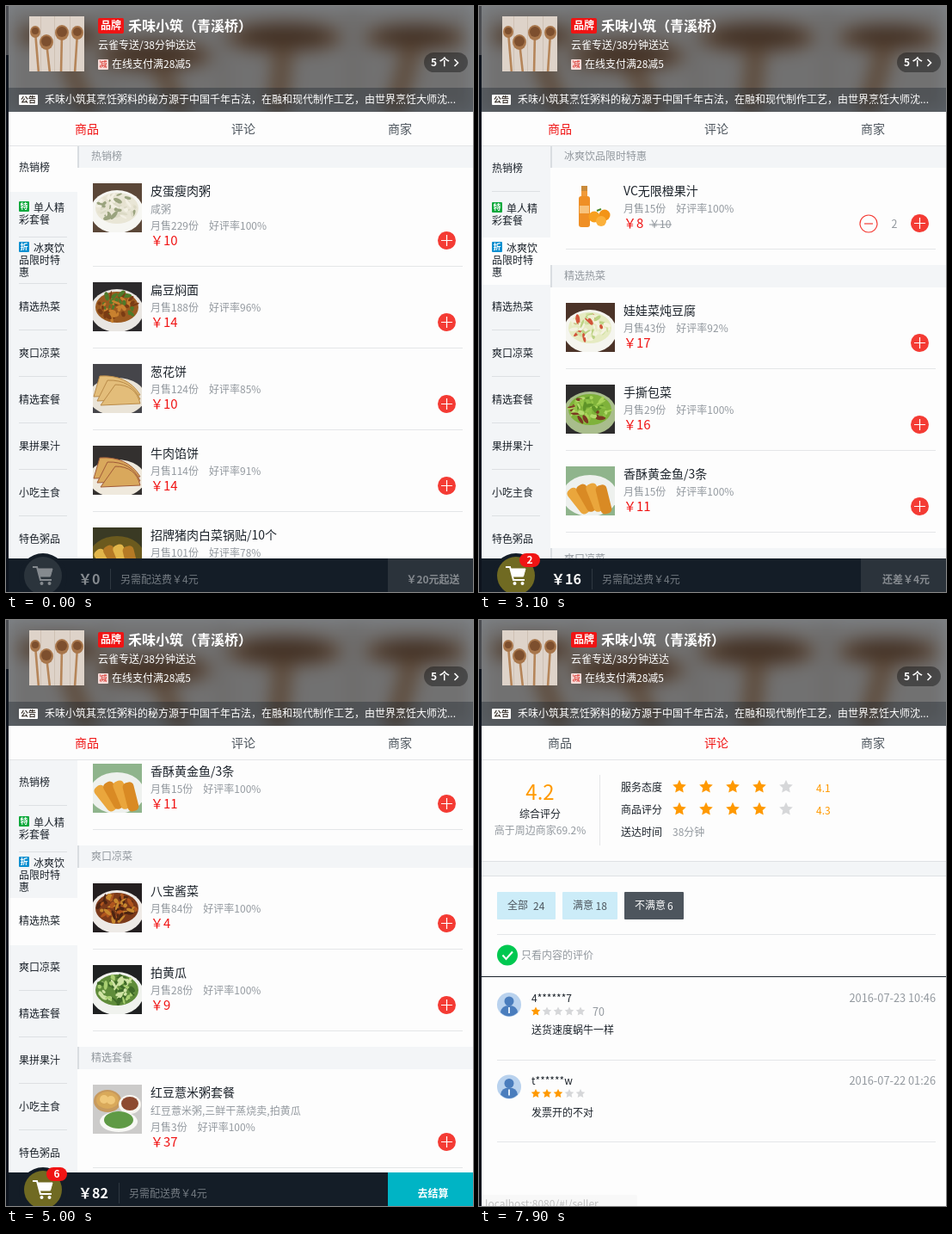
Recreate the animation shown at these times as an HTML page. Size 543 by 681 pixels, loop 8000 ms.

```html
<!DOCTYPE html>
<html lang="zh-CN">
<head>
<meta charset="utf-8">
<title>外卖点餐</title>
<style>
html, body { margin: 0; width: 100%; height: 100%; overflow: hidden; background: #fdfdfd; }
#stage { display: block; width: 543px; height: 681px; }
text { font-family: "Noto Sans CJK SC", "Noto Sans CJK", "Noto Sans", sans-serif; white-space: pre; }
.blur { filter: blur(10px); }
</style>
</head>
<body>
<svg id="stage" viewBox="0 0 543 681" xmlns="http://www.w3.org/2000/svg"></svg>
<script>
const RED = '#f01414', PLUS = '#f43b34', INK = '#1c232b', GREY = '#93999f', LINE = '#e4e6e8',
      PALE = '#f3f5f7', ORANGE = '#ff9900', BLUE = '#00a0dc', PAGE = '#fdfdfd', BAR = '#141d27';
const LOOP = 8000, STEP = 100, TOP = 162;

// --- drawing helpers; text is placed by its visual centre line
const rect = (x, y, w, h, fill, more = '') => `<rect x="${x}" y="${y}" width="${w}" height="${h}" fill="${fill}" ${more}/>`;
const oval = (x, y, rx, ry, fill, more = '') => `<ellipse cx="${x}" cy="${y}" rx="${rx}" ry="${ry}" fill="${fill}" ${more}/>`;
const disc = (x, y, r, fill, more) => oval(x, y, r, r, fill, more);
const path = (d, stroke, w = 1, fill = 'none') => `<path d="${d}" stroke="${stroke}" stroke-width="${w}" fill="${fill}"/>`;
const text = (x, y, s, size = 12, fill = INK, more = '') =>
  `<text x="${x}" y="${y + size * .37}" font-size="${size}" fill="${fill}" ${more}>${s}</text>`;
const BOLD = ' font-weight="700"', MID = 'text-anchor="middle"', END = 'text-anchor="end"';
const group = (id, body = '', more = '') => `<g id="${id}" ${more}>${body}</g>`;

function star(x, y, r, fill) {
  const pts = Array.from({ length: 10 }, (_, i) => {
    const a = i * Math.PI / 5, q = i % 2 ? r * .48 : r;
    return `${(x + q * Math.sin(a)).toFixed(1)},${(y - q * Math.cos(a)).toFixed(1)}`;
  });
  return `<polygon points="${pts.join(' ')}" fill="${fill}"/>`;
}
const stars = (x, y, n, gap, r) =>
  [0, 1, 2, 3, 4].map(i => star(x + i * gap, y, r, i < n ? ORANGE : '#d6d7d9')).join('');

function random(seed) {
  return () => (seed = seed * 16807 % 2147483647) / 2147483647;
}

// --- dish thumbnails, 57 x 57
const ART = {
  bowl(c, rnd) {
    let s = oval(28, 33, 31, 25, c[1]) + oval(28, 29, 25, 18, c[2]);
    for (let i = 0; i < 54; i++) {
      const a = rnd() * 6.28, d = Math.sqrt(rnd()), x = 28 + d * 22 * Math.cos(a), y = 28 + d * 15 * Math.sin(a);
      s += oval(x, y, 2 + rnd() * 4, 1 + rnd() * 1.5, c[3 + i % (c.length - 3)], `transform="rotate(${rnd() * 180} ${x} ${y})"`);
    }
    return s;
  },
  pie(c) {
    return oval(28, 38, 33, 22, c[1]) + [0, 1, 2].map(i =>
      path(`M${1 + i * 4} ${38 + i * 5}L${8 + i * 9} ${14 + i * 5}Q${40 + i * 5} ${12 + i * 6} 55 ${36 + i * 5}Z`, c[3], 1, c[2])).join('');
  },
  fish(c) {
    return oval(28, 34, 32, 24, c[1]) + [0, 1, 2, 3].map(i =>
      rect(5 + i * 10, 13 + i * 4, 13, 34, c[2 + i % 2], `rx="5" transform="rotate(${-38 + i * 8} 28 30)"`)).join('');
  },
  set(c) {
    return oval(17, 19, 16, 13, '#c79a5e') + oval(17, 18, 13, 10, c[1]) + disc(13, 17, 5, c[2]) + disc(21, 18, 5, c[2]) +
      oval(43, 23, 13, 11, '#f7f5f0') + oval(43, 22, 10, 8, '#8d4a30') + oval(30, 43, 22, 12, '#f8f8f5') + oval(30, 41, 17, 10, c[3]);
  },
  juice() {
    return rect(18, 3, 7, 6, '#c98a3a') + rect(18, 9, 7, 8, '#f09a3a') + rect(15, 15, 13, 36, '#ef8f25', 'rx="3"') +
      rect(16, 26, 11, 9, '#f8c37c') + disc(33, 39, 6.5, '#f7a01e') + disc(45, 37, 6.5, '#f39416') + disc(41, 44, 6, '#fbb03a') +
      path('M36 32l5 -2', '#4b8b2a', 2);
  }
};
function thumb(x, y, [kind, ...c], seed) {
  return `<svg x="${x}" y="${y}" width="57" height="57">${rect(0, 0, 57, 57, c[0])}${ART[kind](c, random(seed * 7919 + 13))}</svg>`;
}

// --- menu: name, price, sold, rating, thumbnail, description, old price
const MENU = [
  ['热销榜', [
    ['皮蛋瘦肉粥', 10, 229, 100, 'bowl #5b4738 #f6f6f2 #e9e6d6 #dcdac6 #9aa37e #f3f0e4 #e6e2d0', '咸粥'],
    ['扁豆焖面', 14, 188, 96, 'bowl #2c2a2c #e9e6e2 #9b5a20 #c9812f #4f7a2a #7a3c14'],
    ['葱花饼', 10, 124, 85, 'pie #45454a #eae4d8 #e3bd7a #b98a48'],
    ['牛肉馅饼', 14, 114, 91, 'pie #33302f #efe9dd #d9a85c #a05a38'],
    ['招牌猪肉白菜锅贴/10个', 17, 101, 78, 'fish #3a3a24 #6b5a1e #e2b64a #b57a25'],
    ['南瓜粥', 9, 91, 100, 'bowl #5a4434 #f4f2ee #f0b33a #f5c55a #e39a22', '甜粥'],
    ['红豆薏米美肌粥', 12, 86, 100, 'bowl #6b5444 #f4f2ee #a5574a #7d3430 #e6d6c4', '甜粥'],
    ['八宝酱菜', 4, 84, 100, 'bowl #2a2526 #eeeae6 #7c3a1a #a8521e #4d2412 #c8892f'],
    ['红枣山药糙米粥', 10, 81, 91, 'bowl #584336 #f4f2ee #d9b99a #a03a2a #f0e4d0'],
    ['糊塌子', 10, 80, 93, 'pie #3b3634 #ece8dc #dcc46a #8f9a3e']]],
  ['单人精彩套餐', [['红枣山药粥套餐', 29, 17, 100, 'set #c9c8c8 #f1e2c0 #fbf6ea #a6d352', '红枣山药糙米粥,素材包,爽口莴笋丝,四川泡菜或八宝酱菜,配菜可备注', 36]]],
  ['冰爽饮品限时特惠', [['VC无限橙果汁', 8, 15, 100, 'juice #fdfdfd', '', 10]]],
  ['精选热菜', [
    ['娃娃菜炖豆腐', 17, 43, 92, 'bowl #4b3328 #f5f5ef #e6ebc2 #d2e0a4 #f6f3df #eef0d2 #bcd284 #f4f2e2 #d2553a'],
    ['手撕包菜', 16, 29, 100, 'bowl #2d2c2c #a9bd8c #7fb23a #a9d45a #5f9428 #8cc044 #96c548 #b4da6c #7a3a22'],
    ['香酥黄金鱼/3条', 11, 15, 100, 'fish #8fb48c #eef1ee #eaa63c #d98a24']]],
  ['爽口凉菜', [
    ['八宝酱菜', 4, 84, 100, 'bowl #241f20 #eeeae6 #7c3a1a #b0561e #4d2412 #c8892f'],
    ['拍黄瓜', 9, 28, 100, 'bowl #1f2122 #f0f2ee #5f8c3a #a9cf72 #3f6a28 #cfe3a4']]],
  ['精选套餐', [['红豆薏米粥套餐', 37, 3, 100, 'set #cccbca #d9a95a #f0c87a #5f9a45', '红豆薏米粥,三鲜干蒸烧卖,拍黄瓜']]]
];
const SIDE = [['热销榜'], ['单人精', '彩套餐'], ['冰爽饮', '品限时特', '惠'], ['精选热菜'], ['爽口凉菜'],
              ['精选套餐'], ['果拼果汁'], ['小吃主食'], ['特色粥品']];

const offsets = [], controlY = {};
function menuList() {
  let y = 0, s = '', n = 0;
  for (const [title, foods] of MENU) {
    offsets.push(y);
    s += rect(83, y, 460, 26, PALE) + rect(83, y, 2, 26, '#d9dde1') + text(99, y + 13, title, 12, GREY);
    y += 44;
    for (const [name, price, sold, rate, art, desc, old] of foods) {
      const d = desc ? 20 : 0, cy = y + 46.5 + d, info = `月售${sold}份`;
      s += thumb(101, y, art.split(' '), ++n) + text(168, y + 9, name, 14);
      if (desc) s += text(168, y + 30.5, desc, 12, GREY);
      s += text(168, y + 30 + d * .97, `${info}<tspan dx="12">好评率${rate}%</tspan>`, 12, GREY);
      s += text(168, cy, '￥' + price, 15, RED);
      if (old) {
        const w = price > 9 ? 38 : 30;
        s += text(168 + w, cy + 1, '￥' + old, 12, GREY) + rect(168 + w, cy + 1, 26, 1, GREY);
      }
      s += disc(512.5, cy, 10.5, PLUS) + path(`M506 ${cy}h13M512.5 ${cy - 6.5}v13`, '#fff', 1.2);
      s += rect(101, y + 76 + d, 430, 1, LINE);
      controlY[name] = cy;
      y += 95 + d;
    }
  }
  return s;
}

function sidebar(active) {
  let s = rect(3, TOP, 80, 480, PALE);
  SIDE.forEach((lines, k) => {
    const shift = k >= active ? -1 : 0, top = TOP + 54 * k + shift, mid = top + 27;
    if (k !== active && k !== active - 1) s += rect(15, top + 53, 56, 1, '#dde0e3');
    if (k === active) s += rect(3, top, 80, 55, PAGE);
    const first = mid - (lines.length - 1) * 7;
    const tag = { 1: ['特', '#0aa83a'], 2: ['折', '#0a8fd0'] }[k];
    if (tag) s += rect(15, first - 8, 12, 12, tag[1], 'rx="1"') + text(21, first - 2, tag[0], 9, '#fff', MID + BOLD);
    lines.forEach((l, i) => s += text(tag && !i ? 32 : 15, first + i * 14, l));
  });
  return s;
}

// wooden spoons on a pale board, 64 x 64
function spoons() {
  const board = rect(0, 0, 64, 64, '#ded3c9') + [13, 29, 47].map(x => rect(x, 0, 1, 64, '#cfc1b4')).join('');
  return board + [[7, 18, 6, 4], [20, 30, 8, 4], [38, 19, 8, -1], [56, 19, 7, -3]].map(([x, y, r, lean]) =>
    path(`M${x} ${y}L${x + lean} 66`, '#b58559', 2.6) + oval(x, y, r, r + 1, '#a8764b') + oval(x, y - 1, r - 2, r - 2, '#7d4f2e')).join('');
}

function header() {
  return `<svg x="3" width="540" height="123"><g class="blur"><g transform="scale(8.4375 1.921875)">${spoons()}</g></g>` +
    rect(0, 0, 540, 123, '#07111b', 'opacity=".5"') + rect(0, 95, 540, 28, '#07111b', 'opacity=".3"') + '</svg>' +
    `<svg x="27" y="12" width="64" height="64">${spoons()}</svg>` +
    rect(107, 14, 30, 18, RED, 'rx="2"') + text(122, 23, '品牌', 12, '#fff', MID + BOLD) +
    text(142, 23, '禾味小筑（青溪桥）', 16, '#fff', BOLD) +
    text(107, 46, '云雀专送/38分钟送达', 12, '#fff') +
    rect(107, 62, 12, 12, '#f6dcd9', 'rx="1"') + text(113, 68, '减', 9, '#e0524c', MID + BOLD) +
    text(123, 68, '在线支付满28减5', 12, '#fff') +
    rect(486, 54, 51, 23, '#000', 'rx="11.5" opacity=".38"') + text(494, 65.5, '5 个', 12, '#fff', BOLD) +
    path('M521.5 62l4 4 -4 4', '#fff', 1.6) +
    rect(15, 103, 22, 12, '#fff', 'rx="1"') + text(26, 109, '公告', 9, '#3b342e', MID + BOLD) +
    text(45, 109, '禾味小筑其烹饪粥料的秘方源于中国千年古法，在融和现代制作工艺，由世界烹饪大师沈...', 12, '#fff', 'font-weight="500"');
}

const tabs = active => rect(3, 123, 540, 39, PAGE) + rect(3, 162, 540, 1, '#e3e5e7') +
  ['商品', '评论', '商家'].map((s, i) => text(94 + 182 * i, 143, s, 14, i === active ? RED : '#4d555d', MID)).join('');

function cart(count, total) {
  const on = count > 0, digits = String(total).length, split = 111 + 10 * digits, ink = on ? '#fff' : '#858a8f';
  const pay = total >= 20 ? '去结算' : on ? `还差￥${20 - total}元` : '￥20元起送';
  let s = rect(3, 642, 540, 39, BAR) + disc(43, 664, 28, BAR) + disc(43, 662, 22, on ? '#706a22' : '#2b343c');
  s += path('M31 652h5l4 15h13', ink, 2) + path('M37 654h17l-2.5 9h-12z', ink, 1, ink) + disc(41.5, 671, 2, ink) + disc(50.5, 671, 2, ink);
  s += text(84, 666, '￥' + total, 16, ink, BOLD) + rect(split, 654, 1, 24, '#2f3841') +
    text(split + 12, 667, '另需配送费￥4元', 12, '#747b82');
  s += rect(444, 642, 99, 39, total >= 20 ? '#00b4c5' : '#2b333b') +
    text(496.5, 667, pay, 12, total >= 20 ? '#fff' : '#858a8f', MID + BOLD);
  if (on) s += rect(47, 636, 24, 16, RED, 'rx="8"') + text(59, 644, count, 12, '#fff', MID + BOLD);
  return s;
}

// --- ratings page
function review(dy, [user, date, score, body, wait, likes]) {
  const y = 447 + dy, bottom = likes ? 532 : 510.5;
  let s = disc(35, y, 14, '#b9d2ee') + disc(35, y - 4, 5.5, '#4a7dbd') + path(`M25 ${y + 9}q1 -8 10 -8t10 8q-10 9 -20 0`, 'none', 0, '#4a7dbd') +
    path(`M35 ${y + 3}v7`, '#dce9f7', 2);
  s += text(61, y - 7, user) + text(531, y - 7.5, date, 12.8, GREY, END) + stars(66, y + 8, score, 13, 5.6);
  if (wait) s += text(132, y + 8.5, wait, 12.5, GREY);
  s += text(61, y + 30, body);
  if (likes) {
    s += rect(61, y + 53, 3, 8, BLUE) + path(`M65 ${y + 53}l3 -5q3 0 1.5 4h3.5l-1 9h-7z`, 'none', 0, BLUE);
    let x = 81;
    for (const like of likes) {
      const w = 12 * like.length + 14;
      s += rect(x + .5, y + 47.5, w - 1, 17, 'none', 'stroke="#dcdee0"') + text(x + 7, y + 56, like, 12, GREY);
      x += w + 8;
    }
  }
  return s + rect(21, Math.round(bottom + dy), 510, 1, LINE);
}
const GOOD = [
  ['5******k', '2016-07-23 21:52', 5, '不错,粥很好喝,我经常吃这一家,非常赞,以后也会常来吃,强烈推荐.', 30, ['南瓜粥', '皮蛋瘦肉粥', '扁豆焖面', '娃娃菜炖豆腐', '牛肉馅饼']],
  ['8******6', '2016-07-23 18:54', 4, '服务态度不错', 0, ['扁豆焖面']],
  ['6******m', '2016-07-23 16:17', 5, '', 0, []]];
const BAD = [
  ['4******7', '2016-07-23 10:46', 1, '送货速度蜗牛一样', 70],
  ['t******w', '2016-07-22 01:26', 3, '发票开的不对', 0]];

function ratings(filter) {
  let s = rect(3, 163, 540, 518, PAGE);
  s += text(71, 200, '4.2', 24, ORANGE, MID) + text(71, 226, '综合评分', 12, INK, MID) +
    text(71, 245, '高于周边商家69.2%', 12, GREY, MID) + rect(140, 180, 1, 82, LINE);
  [['服务态度', '4.1'], ['商品评分', '4.3']].forEach(([label, score], i) => {
    const y = 195 + 26 * i;
    s += text(165, y, label) + stars(233, y - 1, 4, 31, 8.2) + text(392, y + .5, score, 12, ORANGE);
  });
  s += text(165, 247, '送达时间') + text(225, 247, '38分钟', 12, GREY);
  s += rect(3, 280, 540, 18, PALE) + rect(3, 280, 540, 1, '#dfe1e4') + rect(3, 297, 540, 1, '#dfe1e4');
  [[21, 68, '全部', 63, 24, '#ccecf8', BLUE], [97, 64, '满意', 135.5, 18, '#ccecf8', BLUE],
   [169, 69, '不满意', 219, 6, '#dbdcdf', '#4d555d']].forEach(([x, w, label, nx, n, off, on], i) => {
    const ink = i === filter ? '#fff' : '#4d555d', more = i === filter ? 'font-weight="500"' : '';
    s += rect(x, 316, w, 32, i === filter ? on : off, 'rx="1"') + text(x + 12, 332, label, 12, ink, more) + text(nx, 332.5, n, 12, ink, more);
  });
  s += rect(21, 365, 510, 1, LINE) + disc(33, 389.5, 12, '#00c850') + path('M27.5 389.5l4 4.5 7.5 -8.5', '#fff', 2) +
    text(49, 390, '只看内容的评价', 12, GREY) + rect(3, 414, 540, 1, '#1a222b');
  return s + (filter === 2 ? BAD : GOOD).map((r, i) => review(i * (filter === 2 ? 95.5 : 117.5), r)).join('');
}

// --- timeline
const SCROLL = [[800, 0], [900, 585], [1000, 965], [1100, 1053], [1200, 1054], [1600, 1054], [1700, 1142], [1800, 1200], [1900, 1213],
                [4400, 1213], [4500, 1275], [4600, 1361], [4700, 1450], [4800, 1520], [4900, 1562], [5000, 1581]];
const HINT = [[5400, 0], [5500, .5], [5600, 1], [6600, 1], [6700, .5], [6800, 0], [7800, 0], [7900, .45]];
const BUYS = [
  { name: 'VC无限橙果汁', price: 8, at: 2630, again: 2900 },
  { name: '娃娃菜炖豆腐', price: 17, at: 3401, again: 3700 },
  { name: '手撕包菜', price: 16, at: 4015, again: 4300 }];
const PAGE_AT = 5900, FLIGHT = 400, BUY_SCROLL = 1213;

function track(keys, t) {
  const i = keys.findIndex(k => k[0] > t);
  if (i === 0) return keys[0][1];
  if (i < 0) return keys[keys.length - 1][1];
  const [t0, a] = keys[i - 1], [t1, b] = keys[i];
  return a + (b - a) * (t - t0) / (t1 - t0);
}
function bezier(x1, y1, x2, y2, x) {
  const f = (a, b, s) => 3 * (1 - s) ** 2 * s * a + 3 * (1 - s) * s * s * b + s ** 3;
  let lo = 0, hi = 1;
  for (let i = 0; i < 20; i++) {
    const m = (lo + hi) / 2;
    if (f(x1, x2, m) < x) lo = m; else hi = m;
  }
  return f(y1, y2, lo);
}

function stepper(buy, t) {
  const p = Math.min(1, (t - buy.at) / FLIGHT), y = controlY[buy.name] + .5;
  return `<g opacity="${p}" transform="translate(${24 * (1 - p)} 0)">` +
    `<g transform="rotate(${180 * (1 - p)} 453 ${y})">${disc(453, y, 10, 'none', `stroke="${PLUS}" stroke-width="1.2"`)}` +
    path(`M448 ${y}h10`, PLUS, 1.2) + `</g></g>` + text(483, y, t >= buy.again ? 2 : 1, 12.5, GREY, MID);
}
function ball(buy, t) {
  const p = (t - buy.at) / FLIGHT;
  if (p < 0 || p > .99) return '';
  const y0 = controlY[buy.name] - BUY_SCROLL + TOP - 26;
  return disc(504 - 461 * p, y0 + (651 - y0) * bezier(.49, -.29, .75, .41, p), 8, PLUS);
}

const stage = document.getElementById('stage');
stage.innerHTML = rect(0, 0, 543, 681, PAGE) +
  group('goods', group('side') +
    `<svg x="0" y="${TOP}" width="543" height="480">${group('list', menuList() + group('steppers'))}</svg>` +
    group('cart') + group('balls')) +
  group('ratings') + group('tabs') + header() +
  rect(0, 0, 3, 681, '#0d131d') + rect(0, 0, 3, 57, '#4a4c51') + group('hint');
const el = id => document.getElementById(id);
const cache = {};
function put(id, body) {
  if (cache[id] !== body) el(id).innerHTML = cache[id] = body;
}

function draw(t) {
  const rated = t >= PAGE_AT, y = track(SCROLL, t), bought = BUYS.filter(b => t >= b.at);
  let count = 0, total = 0;
  for (const b of bought) {
    const n = t >= b.again ? 2 : 1;
    count += n;
    total += n * b.price;
  }
  el('goods').style.display = rated ? 'none' : '';
  el('list').setAttribute('transform', `translate(0 ${-y})`);
  put('side', sidebar(offsets.filter(o => o <= y).length - 1));
  put('steppers', bought.map(b => stepper(b, t)).join(''));
  put('cart', cart(count, total));
  put('balls', bought.map(b => ball(b, t)).join(''));
  put('ratings', rated ? ratings(t >= 7400 ? 2 : t >= 7000 ? 1 : 0) : '');
  put('tabs', tabs(rated ? 1 : 0));
  const o = track(HINT, t);
  put('hint', o ? `<g opacity="${o}">${rect(3, 668, 181, 16, '#f2f2f2', 'rx="2"')}` +
    text(7, 679, 'localhost:8080/#!/' + (t > 7000 ? 'seller' : 'ratings'), 12, '#777') + '</g>' : '');
}

const start = performance.now();
let last = -1;
function tick() {
  // the picture moves in 100 ms steps, like a 10 fps screen capture
  const t = Math.floor(((performance.now() - start + 8) % LOOP) / STEP) * STEP;
  if (t !== last) draw(last = t);
  requestAnimationFrame(tick);
}
tick();
</script>
</body>
</html>
```
